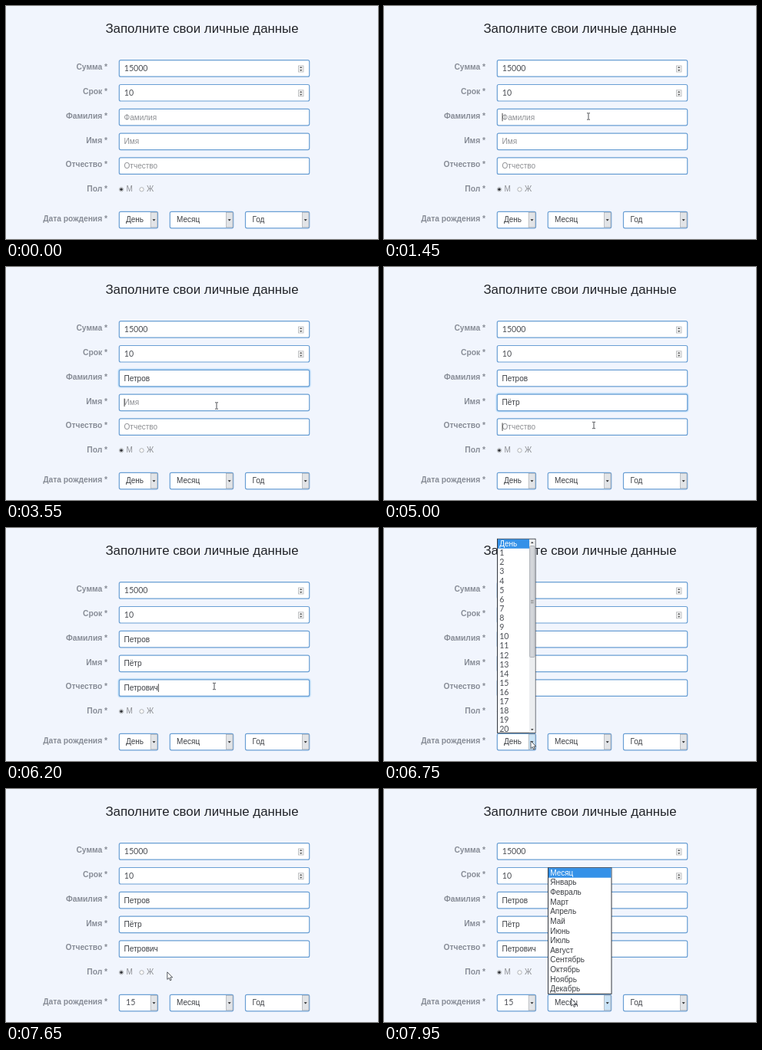
An HTML page for the animation above (8 s loop, 484x304 px).

```html
<!DOCTYPE html>
<html lang="ru">
<head>
<meta charset="utf-8">
<title>Анкета</title>
<style>
html, body { margin: 0; width: 100%; height: 100%; overflow: hidden; background: #f1f5fd; }
svg { display: block; width: 484px; height: 304px; }
text { font: 10px "Liberation Sans", Arial, sans-serif; fill: #3c3f44; }
.title { font-size: 16.85px; fill: #222429; text-anchor: middle; }
.label { font-size: 10.25px; font-weight: bold; fill: #878c96; text-anchor: end; }
.hint { fill: #8d8f93; }
.num { font: 10.6px Lato, sans-serif; fill: #4d5056; }
.box { fill: #fff; stroke: #6a9fd4; stroke-width: 1.2; }
.glow { fill: none; stroke: #7cc0f2; }
.list { fill: #fff; stroke: #33373f; }
.mark { fill: #3491e8; }
text.on { fill: #fff; }
</style>
</head>
<body>
<svg id="stage" viewBox="0 0 484 304"></svg>
<script>
const LOOP = 8000;
const stage = document.getElementById('stage');

function add(tag, attrs, parent = stage, content = '') {
  const node = document.createElementNS('http://www.w3.org/2000/svg', tag);
  for (const key in attrs) node.setAttribute(key, attrs[key]);
  node.textContent = content;
  parent.append(node);
  return node;
}
const rect = (x, y, width, height, attrs, parent) =>
  add('rect', { x, y, width, height, ...attrs }, parent);
const text = (x, y, content, cls = '', parent) =>
  add('text', { x, y, class: cls }, parent, content);
const path = (d, attrs, parent) => add('path', { d, ...attrs }, parent);
const show = (node, on) => node.setAttribute('visibility', on ? 'visible' : 'hidden');
const clamp = v => Math.max(0, Math.min(1, v));
const rowTop = i => 70.7 + 31.8 * i;

// Static form
text(255, 35, 'Заполните свои личные данные', 'title');
['Сумма', 'Срок', 'Фамилия', 'Имя', 'Отчество', 'Пол'].forEach((name, i) =>
  text(132, 83.3 + 31.75 * i, name + ' *', 'label'));
text(132, 281.3, 'Дата рождения *', 'label');

function box(x, y, w, h = 21.5) {
  return rect(x, y, w, h, { class: 'box', rx: 2 });
}

['15000', '10'].forEach((value, i) => {
  const y = rowTop(i);
  box(147.3, y, 247.4);
  text(153.8, y + 14.3, value, 'num');
  rect(380.5, y + 7.3, 6.5, 8, { fill: '#f2f2f2', stroke: '#b5b7ba', 'stroke-width': .8 });
  path(`M382 ${y + 10.4}l1.75 -2 1.75 2zM382 ${y + 12.2}l1.75 2 1.75 -2z`, { fill: '#555' });
});

[[150, 'М', true], [176.5, 'Ж', false]].forEach(([x, name, checked]) => {
  add('circle', { cx: x, cy: 239.3, r: 2.7, fill: '#f8f8f8', stroke: '#a3a6ab', 'stroke-width': .8 });
  if (checked) add('circle', { cx: x, cy: 239.3, r: 1.8, fill: '#33363c' });
  text(x + 6.5, 242.4, name, 'hint');
});

// Text fields: focus from `click` to `blur`, one letter every `step` ms from `start`
const fields = [
  { hint: 'Фамилия', value: 'Петров', click: 1450, start: 2500, step: 55, blur: 3550 },
  { hint: 'Имя', value: 'Пётр', click: 3550, start: 4000, step: 160, blur: 5000 },
  { hint: 'Отчество', value: 'Петрович', click: 5000, start: 5250, step: 105, blur: 6550 }
];
fields.forEach((f, i) => {
  const y = f.y = rowTop(i + 2);
  f.glow = add('g', {});
  [[5, .16], [3, .34]].forEach(([w, opacity]) =>
    rect(147.3, y, 247.4, 21.5, { class: 'glow', rx: 2, 'stroke-width': w, 'stroke-opacity': opacity }, f.glow));
  box(147.3, y, 247.4);
  f.text = text(153.6, y + 14.2, f.hint);
  f.caret = rect(0, y + 5.5, .9, 10.5, { fill: '#333' });
});

function select(x, w, name, textX) {
  box(x, 268.3, w, 21.5);
  const button = rect(x + w - 9.3, 269.3, 8.6, 19.5, { fill: '#e2e4e7', stroke: '#a9adb3', 'stroke-width': .7 });
  path(`M${x + w - 7} 278.2h4l-2 2.4z`, { fill: '#222' });
  return { button, text: text(textX, 282.3, name) };
}
const day = select(147.3, 50.2, 'День', 156);
const month = select(213.3, 82.4, 'Месяц', 222);
select(311.5, 83.2, 'Год', 320.5);

function dropdown(x, y, w, items, pitch, markW) {
  const group = add('g', {});
  rect(x, y, w, 267.3 - y, { class: 'list' }, group);
  const mark = rect(x + .5, y, markW, pitch, { class: 'mark' }, group);
  const rows = items.map((item, i) =>
    text(x + 2.7, y + pitch * (i + .5) + 3.7, item, isNaN(item) ? '' : 'num', group));
  return {
    group,
    pick(index) {
      mark.setAttribute('y', y + pitch * index + .3);
      rows.forEach((row, i) => row.classList.toggle('on', i === index));
    }
  };
}
const days = dropdown(147.5, 14.3, 49.5,
  ['День', ...Array.from({ length: 20 }, (_, i) => i + 1)], 12.12, 41);
rect(189, 14.8, 7.6, 252, { fill: '#eceef0' }, days.group);
rect(189.6, 23.5, 6.4, 145, { fill: '#d3d6da', stroke: '#9b9fa6', 'stroke-width': .7, rx: 1 }, days.group);
path('M191 94.5h3.6M191 96.2h3.6M191 97.9h3.6', { stroke: '#777', 'stroke-width': .7 }, days.group);
path('M191 20l1.8 -2.2 1.8 2.2zM191 262l1.8 2.2 1.8 -2.2z', { fill: '#444' }, days.group);

const months = dropdown(213.5, 102.8, 82.5, ['Месяц', 'Январь', 'Февраль', 'Март', 'Апрель', 'Май',
  'Июнь', 'Июль', 'Август', 'Сентябрь', 'Октябрь', 'Ноябрь', 'Декабрь'], 12.63, 81.5);
months.pick(0);

const arrow = path('M0 0v9.6l2.2 -2 1.5 3.4 1.6 -.7 -1.5 -3.3h3z',
  { fill: '#fff', stroke: '#30343a', 'stroke-width': .8 });
const beam = path('M-2 -4.2h1.4l.6 .5 .6 -.5h1.4M0 -3.7v7.4M-2 4.2h1.4l.6 -.5 .6 .5h1.4',
  { fill: 'none', stroke: '#3a3d42', 'stroke-width': .9 });

// Pointer stops: time, x, y
const stops = [
  [800, 267, 155.5], [1400, 267, 155.5], [1450, 266, 144], [3250, 266, 144], [3500, 274, 181],
  [4750, 274, 181], [4950, 273, 206.5], [6100, 273, 206.5], [6200, 271, 206.5], [6550, 191, 278],
  [6750, 191, 278], [7000, 186, 260], [7350, 175.5, 203.5], [7500, 175.5, 203.5], [7800, 243.5, 273.5]
];
const OPEN_DAY = 6650, CLOSE_DAY = 7500, OPEN_MONTH = 7850;

function pointerAt(t) {
  const next = stops.findIndex(s => s[0] > t);
  if (next < 0) return stops[stops.length - 1].slice(1);
  const [a, b] = [stops[next - 1], stops[next]];
  const k = (t - a[0]) / (b[0] - a[0]);
  const e = k * k * (3 - 2 * k);
  return [a[1] + (b[1] - a[1]) * e, a[2] + (b[2] - a[2]) * e];
}

function drawField(f, t) {
  const count = Math.max(0, Math.min(f.value.length, Math.floor((t - f.start) / f.step) + 1));
  f.text.textContent = count ? f.value.slice(0, count) : f.hint;
  f.text.setAttribute('class', count ? '' : 'hint');
  f.glow.setAttribute('opacity', clamp((t - f.click) / 100) * clamp(1 - (t - f.blur) / 100));

  const lastKey = count ? f.start + (count - 1) * f.step : f.click;
  const blinkOn = t < lastKey + 300 || Math.floor((t - lastKey - 300) / 250) % 2 === 1;
  show(f.caret, t >= f.click && t < f.blur && blinkOn);
  f.caret.setAttribute('x', 153.6 + (count ? f.text.getComputedTextLength() : 0));
}

function draw(t) {
  fields.forEach(f => drawField(f, t));

  const dayOpen = t >= OPEN_DAY && t < CLOSE_DAY, monthOpen = t >= OPEN_MONTH;
  show(days.group, dayOpen);
  show(months.group, monthOpen);
  day.button.setAttribute('fill', dayOpen ? '#c9e3f6' : '#e2e4e7');
  month.button.setAttribute('fill', monthOpen ? '#c9e3f6' : '#e2e4e7');
  const chosen = t >= CLOSE_DAY;
  day.text.textContent = chosen ? '15' : 'День';
  day.text.setAttribute('class', chosen ? 'num' : '');

  const visible = t >= stops[0][0];
  const [x, y] = visible ? pointerAt(t) : [0, 0];
  if (dayOpen) days.pick(y < 267 ? Math.floor((y - 14.3) / 12.12) : 0);
  const inField = !dayOpen && t < CLOSE_DAY && fields.some(f => y > f.y && y < f.y + 21.5);
  show(arrow, visible && !inField);
  show(beam, visible && inField);
  for (const node of [arrow, beam]) node.setAttribute('transform', `translate(${x} ${y})`);
}

const begin = performance.now();
function frame() {
  draw((performance.now() - begin) % LOOP);
  requestAnimationFrame(frame);
}
frame();
</script>
</body>
</html>
```
